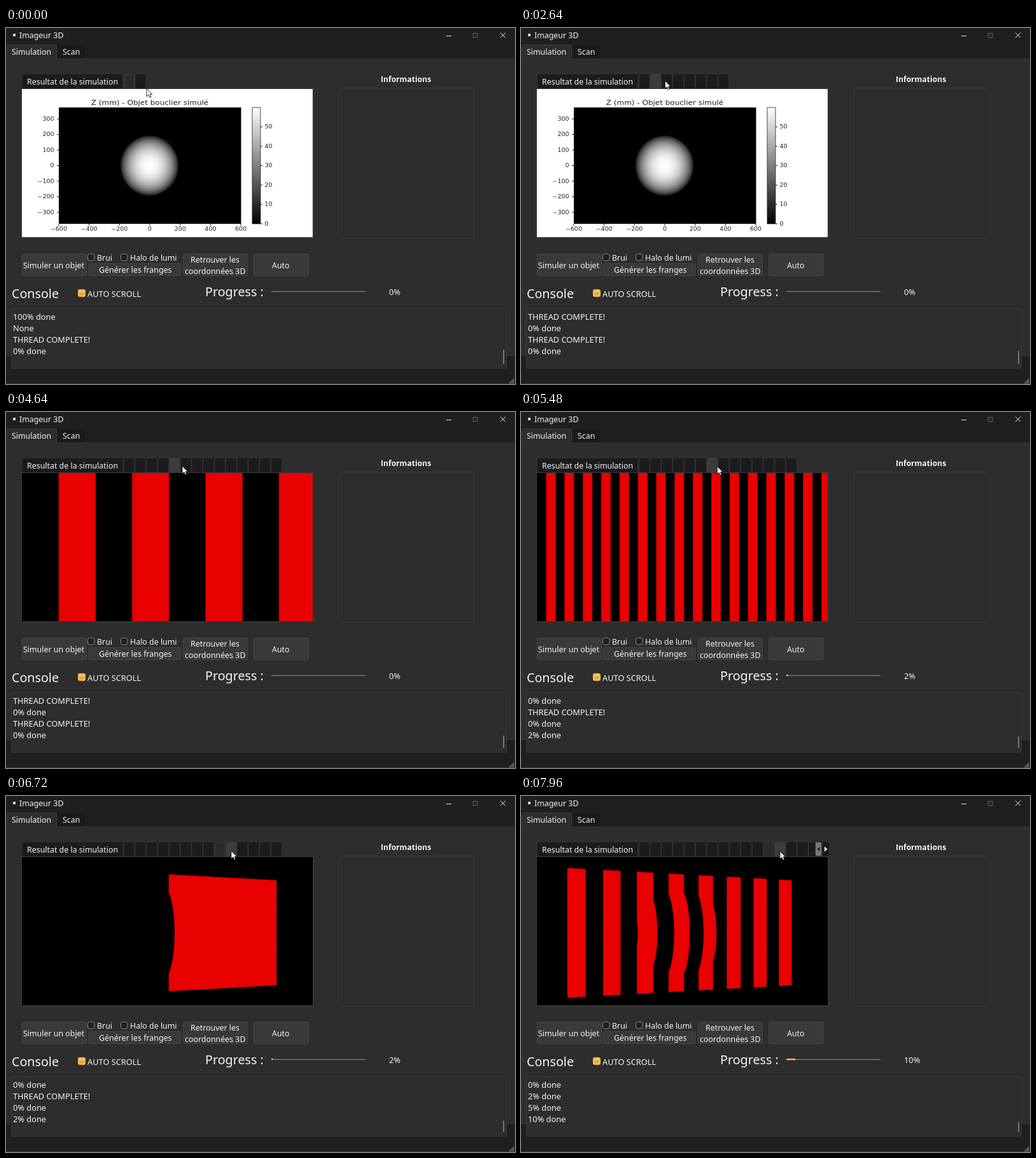
Animation of 800 by 560 pixels, one loop 8 s. Source, as an HTML page:

```html
<!DOCTYPE html>
<html lang="fr">
<head>
<meta charset="utf-8">
<title>Imageur 3D</title>
<style>
  html, body { margin: 0; width: 100%; height: 100%; overflow: hidden; background: #1f1e20; }
  svg { display: block; width: 800px; height: 560px; }
  text { font: 12.4px "Noto Sans", "Open Sans", sans-serif; fill: #f4f4f4; white-space: pre; }
  .big { font-size: 19.7px; }
  .log { font-size: 12.8px; }
  .bold { font: bold 12.1px "Open Sans", sans-serif; }
  .button { fill: #39383a; stroke: #454446; }
  .box { fill: #1f1e20; stroke: #858487; }
  .frame { fill: none; stroke: #3a393b; }
  #plot text { font-family: "DejaVu Sans", sans-serif; fill: #222; }
  #plot line { stroke: #222; }
</style>
</head>
<body>
<svg viewBox="0 0 800 560">
  <defs>
    <radialGradient id="dome"></radialGradient>
    <linearGradient id="ramp" x2="0" y2="1">
      <stop stop-color="#fff"/><stop offset="1" stop-color="#000"/>
    </linearGradient>
    <clipPath id="view"><rect x="25" y="96" width="457" height="233"/></clipPath>
    <clipPath id="bar"><rect id="barClip" x="184" y="70" height="26"/></clipPath>
    <clipPath id="halo"><rect x="190" y="350" width="79" height="20"/></clipPath>
  </defs>

  <!-- window -->
  <rect width="800" height="560" fill="#1f1e20"/>
  <path d="M0 48.5H800V516H0Z" fill="#2d2c2e"/>
  <path d="M0 48.5H800M0 515.5H8M787 515.5H800" stroke="#353436"/>
  <path d="M0 559.5H800" stroke="#38373a"/>
  <rect x="11" y="9" width="4" height="4" fill="#ddd"/>
  <text x="21" y="16">Imageur 3D</text>
  <path d="M692 12.5H700M777 7.5L785 15.5M785 7.5L777 15.5" stroke="#eee" fill="none"/>
  <rect x="734.5" y="8.5" width="6.5" height="6.5" fill="none" stroke="#626164"/>
  <path d="M1.500 48.500V28.500Q1.500 26.500 3.500 26.500H77.500Q79.500 26.500 79.500 28.500V48.500" fill="#2d2c2e" stroke="#3a393b"/>
  <rect x="81" y="27" width="44" height="21" fill="#1a191b"/>
  <text x="9" y="41.500" fill="#fff">Simulation</text>
  <text x="89" y="42">Scan</text>
  <g id="grip" fill="#bbb"></g>

  <!-- result panel -->
  <rect x="26" y="73" width="157" height="22" fill="#1b1a1c"/>
  <text x="33" y="89">Resultat de la simulation</text>
  <g id="tabs" clip-path="url(#bar)"></g>
  <g id="scroller">
    <rect x="463" y="73" width="9" height="21" rx="2" fill="#777679"/>
    <path d="M469.500 79.500V87.500L465.500 83.500Z" fill="#222"/>
    <rect x="474" y="73" width="10" height="21" rx="2" fill="#1b1a1c"/>
    <path d="M477 79.500V87.500L481.500 83.500Z" fill="#fff"/>
  </g>
  <rect class="frame" x="24.500" y="95.500" width="459" height="235"/>
  <g id="plot">
    <rect x="25" y="96" width="457" height="233" fill="#fff"/>
    <rect x="83" y="125" width="286.500" height="183"/>
    <ellipse cx="225.500" cy="216.500" rx="46.500" ry="48" fill="url(#dome)"/>
    <rect x="387" y="125" width="13" height="183" fill="url(#ramp)" stroke="#222" stroke-width=".8"/>
  </g>
  <g id="fringes" clip-path="url(#view)">
    <rect x="25" y="96" width="457" height="233"/>
    <path id="stripes" fill="#e90000" stroke="#b40000" stroke-width=".8"/>
  </g>

  <text class="bold" x="589" y="85">Informations</text>
  <rect class="frame" x="522.500" y="94.500" width="213" height="236.500" rx="3"/>

  <!-- controls -->
  <rect class="button" x="25.500" y="355.500" width="101" height="34" rx="2"/>
  <rect class="button" x="129.500" y="370.500" width="145" height="19" rx="2"/>
  <rect class="button" x="278.500" y="355.500" width="101" height="34" rx="2"/>
  <rect class="button" x="389.500" y="355.500" width="86" height="34" rx="2"/>
  <text x="27" y="378">Simuler un objet</text>
  <text x="146" y="385">Générer les franges</text>
  <text x="290" y="369">Retrouver les</text>
  <text x="281" y="387">coordonnées 3D</text>
  <text x="418" y="378">Auto</text>
  <rect class="box" x="128.500" y="355.500" width="10.500" height="10.500" rx="3"/>
  <rect class="box" x="180.500" y="355.500" width="10.500" height="10.500" rx="3"/>
  <text x="143" y="366">Brui</text>
  <text x="195" y="366" clip-path="url(#halo)">Halo de lumi</text>

  <!-- console -->
  <text class="big" x="9" y="425">Console</text>
  <rect x="113" y="411" width="12" height="12" rx="3" fill="#f6b94f"/>
  <path d="M116 417L118.500 419.500L122.500 416" fill="none" stroke="#a87a2c"/>
  <text class="log" x="128" y="422.500">AUTO SCROLL</text>
  <text class="big" x="313" y="421.500">Progress :</text>
  <path d="M417 414.500H565" stroke="#919093"/>
  <rect id="done" x="417" y="413" height="2.600" rx="1" fill="#f6b94f"/>
  <text id="percent" class="log" x="602" y="419.500"></text>
  <rect x="8.500" y="441.500" width="778" height="94" rx="2" fill="#2d2c2e" stroke="#38373a"/>
  <g id="console"></g>
  <rect id="thumb" x="781.500" width="1.300" fill="#9a999c"/>

  <path id="cursor" d="M0 0V12.200L2.900 9.500L4.900 13.800L7 12.900L5.100 8.800H8.800Z" fill="#fff" stroke="#111" stroke-width=".9"/>
</svg>
<script>
const LOOP = 8000;
const TAB_X = 186, TAB_STEP = 17.8, MAX_TABS = 18;
const $ = id => document.getElementById(id);

function add(parent, tag, attrs, content = '') {
  const node = document.createElementNS('http://www.w3.org/2000/svg', tag);
  for (const key in attrs) node.setAttribute(key, attrs[key]);
  node.textContent = content;
  return parent.appendChild(node);
}

// The figure is shown wider than its natural aspect ratio.
function label(x, y, content, size, anchor) {
  add($('plot'), 'text', {
    transform: `translate(${x} ${y}) scale(1.2 1)`,
    style: `font-size:${size}px`, 'text-anchor': anchor
  }, content);
}
const tick = (x1, y1, x2, y2) => add($('plot'), 'line', { x1, y1, x2, y2 });
const signed = n => String(n).replace('-', '−');

function buildPlot() {
  for (let i = 0; i <= 20; i++) {
    const r = i / 20, v = Math.round(255 * (1 - r * r) ** 0.75);
    add($('dome'), 'stop', { offset: r, 'stop-color': `rgb(${v},${v},${v})` });
  }
  label(226, 120.5, 'Z (mm) - Objet bouclier simulé', 10, 'middle');
  for (let i = -3; i <= 3; i++) {
    const x = 226 + i * 47.7, y = 216.5 - i * 24.5;
    tick(80, y, 83, y);
    label(75.5, y + 2.9, signed(i * 100), 7.9, 'end');
    tick(x, 308, x, 311);
    label(x, 318.7, signed(i * 200), 7.9, 'middle');
  }
  for (let i = 0; i <= 5; i++) {
    const y = 308 - i * 30.5;
    tick(400, y, 403, y);
    label(406.5, y + 2.9, i * 10, 7.9, 'start');
  }
}

// Projected pattern: n black/red pairs across the screen.
function projected(n) {
  const half = 461.5 / n / 2;
  let d = '';
  for (let i = 0; i < n; i++) {
    d += `M${25.3 + (2 * i + 1) * half} 95h${half}v235h${-half}Z`;
  }
  return d;
}

// One edge of the pattern as the camera sees it, bent by the dome.
function edge(u) {
  const x = (43.49 + 30.68 * u) / (1 + 0.01609 * u);
  const top = 113.5 + 0.0545 * (x - 73), bottom = 317 - 0.0552 * (x - 73);
  const points = [];
  for (let i = 0; i <= 100; i++) {
    const y = top + (bottom - top) * i / 100;
    const rest = 1 - ((x - 250) / 71) ** 2 - ((y - 215.5) / 63) ** 2;
    const shift = rest > 0 ? 9.2 * rest ** 0.75 : 0;
    points.push(`${(x + shift).toFixed(2)} ${y.toFixed(2)}`);
  }
  return points;
}

function observed(n) {
  const half = 8 / n;
  let d = '';
  for (let i = 0; i < n; i++) {
    const left = edge((2 * i + 1) * half), right = edge((2 * i + 2) * half);
    d += 'M' + left.concat(right.reverse()).join('L') + 'Z';
  }
  return d;
}

// Tabs 1-2 hold the plot, 3-8 the projections, 9-14 the camera views.
const pictures = [];
for (let i = 0; i < 6; i++) {
  pictures[3 + i] = projected(2 ** i);
  pictures[9 + i] = observed(2 ** i);
}

buildPlot();
for (let row = 0; row < 4; row++) {
  for (let col = 3 - row; col < 4; col++) {
    add($('grip'), 'rect', { x: 791 + col * 2, y: 551.5 + row * 2, width: 1.2, height: 1.2 });
  }
}
const tabs = Array.from({ length: MAX_TABS }, (_, i) => add($('tabs'), 'rect', {
  x: TAB_X + TAB_STEP * i, y: 73, width: 15.4, height: 22.5, rx: 1
}));
const rows = Array.from({ length: 4 }, (_, i) =>
  add($('console'), 'text', { class: 'log', x: 11, y: 458.5 + 18 * i }));

// Start time of each selected tab, beginning with tab 1.
const selectTimes = [0, 1500, 3160, 3960, 4400, 4840, 5320, 5780, 6280, 6720, 7120, 7540, 7930];
const tabAt = t => selectTimes.filter(s => s <= t).length;

// time, tabs, progress, scrollbar top, lines written
const stages = [
  [0, 2, 0, 506, ['100% done', 'None', 'THREAD COMPLETE!', '0% done']],
  [2120, 8, 0, 508, ['THREAD COMPLETE!', '0% done']],
  [3880, 14, 0, 509, ['THREAD COMPLETE!', '0% done']],
  [4760, 14, 2, 510.5, ['2% done']],
  [7680, 16, 5, 511.5, ['5% done']],
  [7840, 18, 10, 512.5, ['10% done']]
];

const path = [
  [0, 221, 95.5], [1000, 215, 82], [1640, 216.5, 79.5], [2900, 229, 84], [3520, 235, 85],
  [4640, 277, 85], [6120, 332, 86], [7240, 373, 87], [7960, 407, 87], [LOOP, 408, 87]
];
function cursorAt(t) {
  const i = path.findIndex(p => p[0] > t);
  const [t0, x0, y0] = path[i - 1], [t1, x1, y1] = path[i];
  const k = (t - t0) / (t1 - t0);
  return [x0 + (x1 - x0) * k, y0 + (y1 - y0) * k];
}

function draw(t) {
  const passed = stages.filter(s => s[0] <= t);
  const [, count, progress, thumbY] = passed[passed.length - 1];
  const lines = passed.flatMap(s => s[4]).slice(-4);
  rows.forEach((row, i) => { row.textContent = lines[i]; });
  $('percent').textContent = progress + '%';
  $('done').setAttribute('width', progress * 1.48);
  $('thumb').setAttribute('y', thumbY);
  $('thumb').setAttribute('height', 528.5 - thumbY);

  const selected = tabAt(t);
  const shown = tabAt(t - 80) || 1; // the picture follows the click
  tabs.forEach((tab, i) => {
    const active = i + 1 === selected, leaving = i + 1 === shown;
    tab.style.display = i < count ? '' : 'none';
    tab.setAttribute('fill', active && selected > 1 ? '#3b3a3c' : active || leaving ? '#2b2a2c' : '#1b1a1c');
    tab.setAttribute('stroke', active ? '#434244' : leaving ? '#353436' : 'none');
  });
  const crowded = count > 15;
  $('scroller').style.display = crowded ? '' : 'none';
  $('barClip').setAttribute('width', crowded ? 278 : 300);

  $('fringes').style.display = pictures[shown] ? '' : 'none';
  $('stripes').setAttribute('d', pictures[shown] || '');
  $('cursor').setAttribute('transform', `translate(${cursorAt(t)})`);
}

const start = performance.now();
function frame() {
  draw((performance.now() - start) % LOOP);
  requestAnimationFrame(frame);
}
frame();
</script>
</body>
</html>
```
